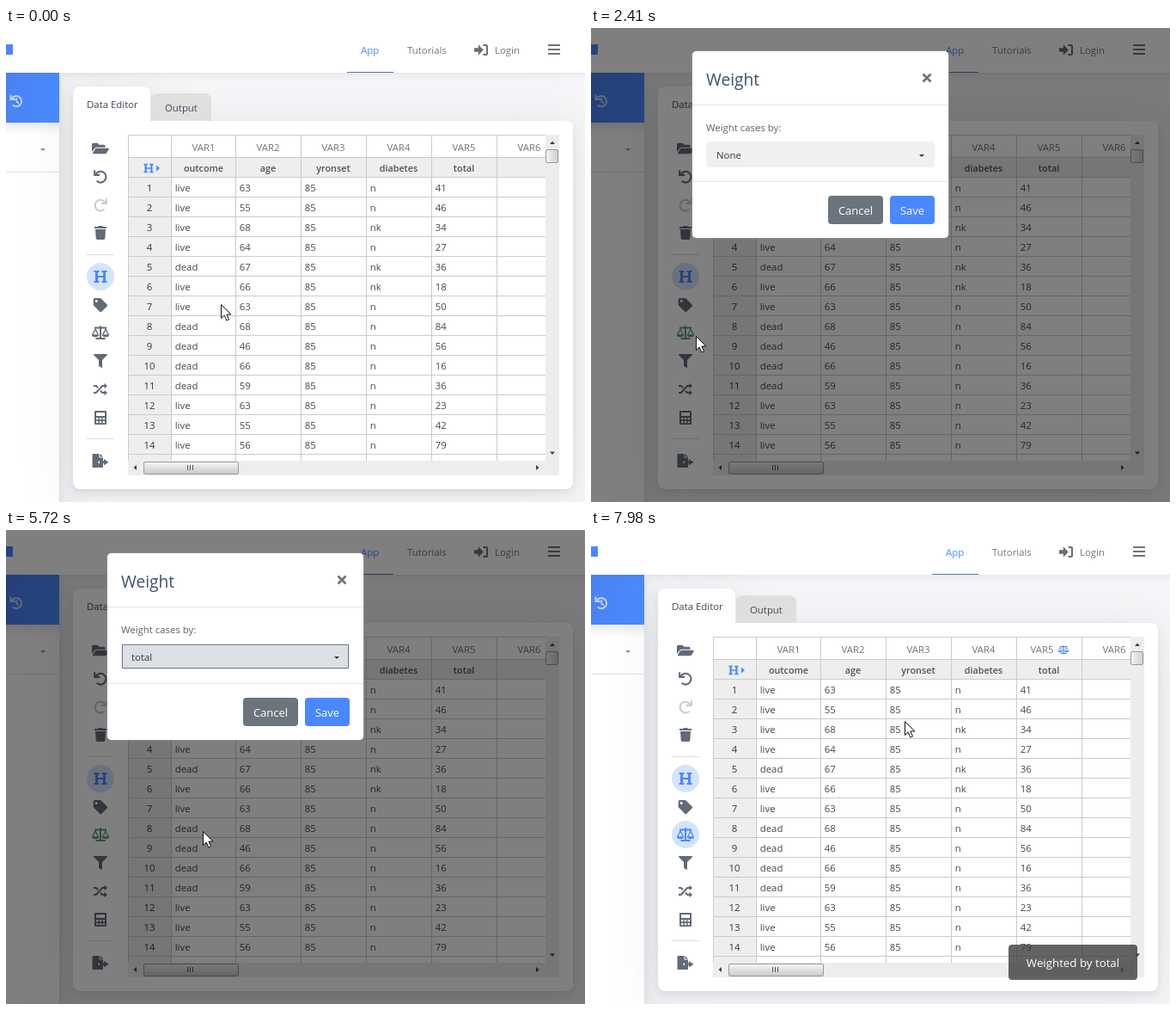
Animation of 674 by 551 pixels, one loop 8000 ms. Source, as an HTML page:

```html
<!DOCTYPE html>
<html lang="en">
<head>
<meta charset="utf-8">
<title>Weight data</title>
<style>
  html, body { margin: 0; width: 100%; height: 100%; overflow: hidden; background: #f5f6f8; }
  svg { display: block; width: 674px; height: 551px; font: 11.4px "Open Sans", "Noto Sans", sans-serif; }
  text { white-space: pre; }
  .bar { filter: drop-shadow(0 2px 5px rgba(90, 97, 105, .12)); }
  .card { filter: drop-shadow(0 4px 4px rgba(90, 97, 105, .13)) drop-shadow(0 7px 30px rgba(90, 97, 105, .12)); }
  .float { filter: drop-shadow(0 1px 8px rgba(0, 0, 0, .2)); }
</style>
</head>
<body>
<svg id="stage" viewBox="0 0 674 551" xmlns="http://www.w3.org/2000/svg"></svg>
<script>
const BLUE = '#4a88ff', TOOL = '#626a78', INK = '#42474f', GRID = '#cbcbcb';

const rect = (x, y, w, h, fill, more = '') =>
  `<rect x="${x}" y="${y}" width="${w}" height="${h}" fill="${fill}" ${more}/>`;
const text = (x, y, s, fill = INK, more = '') =>
  `<text x="${x}" y="${y}" fill="${fill}" ${more}>${s}</text>`;
const mid = (x, y, s, fill, more = '') => text(x, y, s, fill, `text-anchor="middle" ${more}`);
const path = (d, fill, more = '') => `<path d="${d}" fill="${fill}" ${more}/>`;
const line = (d, stroke, w = 1, more = '') =>
  `<path d="${d}" fill="none" stroke="${stroke}" stroke-width="${w}" ${more}/>`;
const group = (id, body, more = '') => `<g id="${id}" ${more}>${body}</g>`;
const round = r => `rx="${r}"`;

// Icons are drawn around 0,0 in currentColor
const solid = d => path(d, 'currentColor', 'fill-rule="evenodd"');
const wire = (d, w) => line(d, 'currentColor', w);
const turn = wire('M-5.6-2.8A6.4 6.4 0 1 1-4.4 4.8', 2.1) + solid('M-7.9-7.8h2.1v4.6h4.9v2.1h-7z');
const icons = {
  folder: solid('M-10 4V-4.7a1.5 1.5 0 0 1 1.5-1.5h5l2 2h5.5a1.5 1.5 0 0 1 1.5 1.5v1.5h-10a2.5 2.5 0 0 0-2.2 1.2z' +
    'M-9 5.3l2.8-4.6a2 2 0 0 1 1.7-1h13.5a.8 .8 0 0 1 .7 1.2l-2.6 4.3a2 2 0 0 1-1.7 1h-13.7a.6 .6 0 0 1-.7-.9z'),
  undo: turn,
  redo: `<g transform="scale(-1 1)">${turn}</g>`,
  history: turn + wire('M.3-4v4.6l2.8 2', 1.8),
  trash: solid('M-7-7h4l1-1h4l1 1h4v2h-14zM-6-4h12l-.7 10.6a1.5 1.5 0 0 1-1.5 1.4h-7.6a1.5 1.5 0 0 1-1.5-1.4z'),
  head: solid('M-7.5-7h6v2h-1.5v4h6v-4h-1.5v-2h6v2h-1.5v10h1.5v2h-6v-2h1.5v-4h-6v4h1.5v2h-6v-2h1.5v-10h-1.5z'),
  tag: solid('M-8.3-.2v-6.3a1.5 1.5 0 0 1 1.5-1.5h6.3a1.5 1.5 0 0 1 1.1 .4l7 7a1.5 1.5 0 0 1 0 2.1l-6.3 6.3a1.5 1.5 0 0 1-2.1 0l-7-7a1.5 1.5 0 0 1-.5-1z' +
    'M-4.8-6a1.5 1.5 0 1 0 .01 0z'),
  scale: wire('M-7-5.4h14M0-7.8v14M-5.5 7h11', 2) + wire('M-9.3 2.5L-6-4l3.3 6.5M2.7 2.5L6-4l3.3 6.5', 1.3) +
    solid('M-10.2 2.2h8.4a4.2 3 0 0 1-8.4 0zM1.8 2.2h8.4a4.2 3 0 0 1-8.4 0z'),
  filter: solid('M-7.3-8h14.6a.8 .8 0 0 1 .5 1.3l-5.8 5.8v8.1a.8 .8 0 0 1-1.2 .6l-2.5-1.8a1 1 0 0 1-.3-.6v-6.3l-5.8-5.8a.8 .8 0 0 1 .5-1.3z'),
  random: wire('M-8 4h2.8L2.2-4H5M-8-4h2.8l2.2 2.3M0 1.7L2.2 4H5', 2) +
    solid('M4.5-7.3L8-4 4.5-.7zM4.5.7L8 4 4.5 7.3z'),
  calc: solid('M-6-8h12a1 1 0 0 1 1 1v14a1 1 0 0 1-1 1h-12a1 1 0 0 1-1-1v-14a1 1 0 0 1 1-1zM-5-6v4h10v-4z' +
    [-5, -1.2, 2.6].map(x => `M${x} 0h2.4v2.2h-2.4zM${x} 4h2.4v2.2h-2.4z`).join('')),
  out: solid('M-8.5-8h7v4.5h4.5v4h-5.5v2.5h5.5v4a1 1 0 0 1-1 1h-10.5a1 1 0 0 1-1-1v-14a1 1 0 0 1 1-1zM-.5-8l3.5 3.5h-3.5z' +
    'M4-2l5.5 3.8l-5.5 3.8v-2.6h-5v-2.4h5z'),
  login: solid('M-8-2.2h4.8v-4l6 6.2-6 6.2v-4h-4.8z') + wire('M2.5-5.4h3.5a1 1 0 0 1 1 1v8.8a1 1 0 0 1-1 1h-3.5', 2)
};
const icon = (name, x, y, color, size = 1, id = '') =>
  `<g ${id && `id="${id}"`} transform="translate(${x} ${y}) scale(${size})" color="${color}">${icons[name]}</g>`;
const down = (x, y, fill, w = 3) => path(`M${x - w} ${y}h${2 * w}l${-w} ${w}z`, fill);

const rows = `live 63 n 41,live 55 n 46,live 68 nk 34,live 64 n 27,dead 67 nk 36,live 66 nk 18,live 63 n 50,
dead 68 n 84,dead 46 n 56,dead 66 n 16,dead 59 n 36,live 63 n 23,live 55 n 42,live 56 n 79`.split(',').map(r => r.trim().split(' '));
const names = ['outcome', 'age', 'yronset', 'diabetes', 'total'];
const cols = [192, 267, 343, 419, 495, 571];

function header() {
  return rect(-50, -50, 774, 102, '#fff', 'class="bar"') +
    rect(0, 19, 8, 12, BLUE) +
    text(413, 30, 'App', BLUE) + rect(397, 51, 54, 1, '#5a78b5') +
    text(467, 30, 'Tutorials', '#70767f') + icon('login', 553, 25.5, '#6c6f75') +
    text(569, 30, 'Login', '#70767f') +
    line('M631 20h14M631 25h14M631 30h14', '#707378', 2);
}

function sidebar() {
  return rect(-100, 52, 162, 600, '#fff', 'class="card"') +
    rect(0, 110, 62, 14, 'url(#drop)') + rect(0, 52, 62, 58, 'url(#blue)') +
    icon('history', 12, 85, '#bdd3fd', .95) +
    down(43, 140, '#8d9096') + rect(0, 167, 62, 1, '#dfe0e3');
}

function tools() {
  const list = [['folder', 140], ['undo', 173], ['redo', 206, '#c9ccd1'], ['trash', 238], ['tag', 322],
    ['filter', 387], ['random', 420], ['calc', 453], ['out', 503]];
  return list.map(([n, y, c]) => icon(n, 110, y, c || TOOL)).join('') +
    rect(94, 263, 32, 1, '#dcdee2') + rect(94, 477, 32, 1, '#dcdee2') +
    '<circle cx="110" cy="289" r="16" fill="#d5e3fc"/>' + icon('head', 110, 289, BLUE) +
    '<circle id="disc" cx="110" cy="354" r="16"/>' + icon('scale', 110, 354, TOOL, 1, 'balance');
}

function table() {
  let s = rect(142, 124, 502, 396, '#fff') + rect(142, 150, 486, 23, '#eee') + rect(142, 173, 50, 330, '#eee');
  s += line('M142 124.5H628M142 150.5H628' + Array.from({ length: 15 }, (_, i) => `M142 ${173.5 + 23 * i}H628`).join('') +
    [142, ...cols].map(x => `M${x + .5} 124V503`).join(''), GRID);
  cols.forEach((x, i) => s += mid(x + 38, 143, 'VAR' + (i + 1), '#70747b', i === 4 ? 'id="var5"' : ''));
  names.forEach((n, i) => s += mid(cols[i] + 38, 167, n, '#4d525a', 'font-weight="600" font-size="10.8"'));
  s += icon('head', 166, 163, BLUE, .75) + path('M175 159.5l4 3.5-4 3.5z', BLUE);
  rows.forEach(([state, age, dia, total], r) => {
    const y = 190 + 23 * r;
    s += mid(167, y, r + 1, '#34383e');
    [state, age, 85, dia, total].forEach((v, c) => s += text(cols[c] + 4.7, y, v));
  });
  return s + group('mark', icon('scale', 550, 139, BLUE, .62));
}

function scrollbars() {
  const edge = 'stroke="#9a9a9a" rx="1.5"';
  return rect(628, 124, 16, 396, '#ededed') + rect(142, 503, 502, 17, '#ededed') +
    rect(628.5, 141.5, 14, 15, 'url(#thumbV)', edge) + rect(160.5, 504.5, 110, 14, 'url(#thumbH)', edge) +
    line('M211.5 508v6M214.5 508v6M217.5 508v6', '#555') +
    path('M633 135l3-3.5 3 3.5zM633 492.5l3 3.5 3-3.5zM152 508l-3.5 3 3.5 3zM617 508l3.5 3-3.5 3z', '#444');
}

function page() {
  const panel = 'M78 108V76a8 8 0 0 1 8-8h74a8 8 0 0 1 8 8v32h484a8 8 0 0 1 8 8v412a8 8 0 0 1-8 8H86a8 8 0 0 1-8-8z';
  return rect(0, 0, 674, 551, '#f5f6f8') + sidebar() + path(panel, '#fff', 'class="card"') +
    path('M169 108V84a8 8 0 0 1 8-8h54a8 8 0 0 1 8 8v24z', '#dfdfdf') +
    text(94, 93, 'Data Editor', '#414958') + text(185, 97, 'Output', '#414958') +
    header() + tools() + table() + scrollbars();
}

function modal() {
  return rect(117.5, 26.5, 299, 218, '#fff', 'rx="5" stroke="#000" stroke-opacity=".25"') +
    text(134, 67, 'Weight', '#3d5170', 'font-size="19.2"') +
    line('M386.5 53.5l9 9m0-9l-9 9', '#6c737b', 2.6) +
    rect(118, 89, 298, 1, '#e0e4e8') + rect(118, 178, 298, 1, '#e0e4e8') +
    text(134, 120, 'Weight cases by:', '#5a6169') +
    rect(132.5, 130.5, 269, 33, 'none', 'id="ring" rx="5" stroke="#e9ebed" stroke-width="3"') +
    rect(134, 132, 266, 30, '#f0f0f0', 'id="field" rx="4"') +
    rect(135.5, 133.5, 263, 27, 'none', 'id="dots" stroke="#222" stroke-dasharray="1 1"') +
    text(146, 152, 'None', '#33383e', 'id="choice"') + down(385, 147, '#33383e') +
    rect(276, 195, 64, 33, '#6c757d', round(4)) + mid(308, 217, 'Cancel', '#fff', 'font-size="13"') +
    rect(348, 195, 52, 33, BLUE, 'id="save" rx="4"') + mid(374, 217, 'Save', '#fff', 'font-size="13"');
}

function menu() {
  return rect(134, 163, 266, 211, '#fff', 'rx="4" class="float"') +
    rect(150.5, 170.5, 233, 33, '#fff', 'rx="4" stroke="#ced4da"') +
    rect(163, 179, 1, 16, '#222', 'id="caret"') + rect(134, 210, 266, 26, BLUE) +
    ['None', ...names].map((n, i) => text(154, 228 + 26 * i, n, i ? '#24282d' : '#fff')).join('');
}

const grad = (id, dir, from, to) =>
  `<linearGradient id="${id}" ${dir}><stop stop-color="${from}"/><stop offset="1" stop-color="${to}"/></linearGradient>`;
const across = 'x2="1" y2="0"', along = 'x2="0" y2="1"';

document.getElementById('stage').innerHTML =
  '<defs>' + grad('blue', across, '#4a82f4', '#4a8bff') +
  grad('drop', along, 'rgba(40,50,70,.1)', 'rgba(40,50,70,0)') +
  grad('thumbV', across, '#f6f6f6', '#cfcfcf') + grad('thumbH', along, '#f6f6f6', '#c9c9c9') + '</defs>' +
  page() + rect(0, 0, 674, 551, '#000', 'id="shade"') +
  group('modal', modal()) + group('menu', menu()) +
  group('tip', rect(8, 342, 79, 24, '#000', round(4)) + path('M87 350l4.5 4-4.5 4z', '#000') + text(15, 358.5, 'Weight Data', '#fff')) +
  group('toast', rect(486, 482, 150, 41, '#3c3c3c', 'rx="4" fill-opacity=".8"') +
    mid(561, 508, 'Weighted by total', '#fff', 'font-size="13.3"')) +
  group('arrow', path('M.5.5v16l3.7-3.5 2.7 6 2.6-1.1-2.6-5.9h5z', '#fff', 'stroke="#111"')) +
  group('hand', path('M-.5 13V1.8a1.6 1.6 0 0 1 3.2 0V7.2a1.5 1.5 0 0 1 3 .3a1.5 1.5 0 0 1 3 .6a1.5 1.5 0 0 1 3 .8V14.5l-2 4V21.5H1v-2.5l-4.3-6a1.5 1.5 0 0 1 2.3-1.6z', '#fff', 'stroke="#111"') +
    line('M2.7 7v4M5.7 7.5v3.5M8.7 8.3v3', '#111'));

const el = {};
document.querySelectorAll('svg [id]').forEach(e => el[e.id] = e);
const set = (id, attrs) => { for (const k in attrs) el[id].setAttribute(k, attrs[k]); };
const show = (id, on) => set(id, { opacity: +on });

const ramp = (t, a, b) => Math.min(1, Math.max(0, (t - a) / (b - a)));
const smooth = p => p * p * (3 - 2 * p);
const easeOut = p => 1 - (1 - p) ** 3;
const within = (t, a, b) => t >= a && t < b;
const blend = (a, b, p) => `rgb(${a.map((v, i) => Math.round(v + (b[i] - v) * p))})`;

// Each move: start, end, from, bend, to
const moves = [
  [500, 1320, [250, 321], [185, 352], [122, 358]],
  [2420, 3100, [122, 358], [196, 300], [202, 153]],
  [4150, 4600, [202, 153], [212, 245], [223, 327]],
  [4700, 4830, [223, 327], [227, 340], [229, 350]],
  [5970, 6740, [229, 350], [300, 278], [365, 222]]
];
function pointer(t) {
  const [a, b, from, bend, to] = moves.filter(m => t >= m[0]).pop() || moves[0];
  const p = smooth(ramp(t, a, b)), q = 1 - p;
  return [0, 1].map(i => Math.round(q * q * from[i] + 2 * q * p * bend[i] + p * p * to[i]));
}

function draw(t) {
  const [x, y] = pointer(t);
  const hand = within(t, 2980, 5540) || within(t, 6480, 7690);
  for (const id of ['arrow', 'hand']) set(id, { transform: `translate(${x} ${y})` });
  show('arrow', !hand);
  show('hand', hand);

  // Balance button and its tooltip
  const weighted = t >= 7390;
  const hover = ramp(t, 1190, 1320) * (1 - ramp(t, 2040, 2190));
  set('disc', { fill: weighted ? '#d5e3fc' : '#69707d', opacity: weighted ? 1 : hover });
  set('balance', { color: weighted ? BLUE : t > 2190 ? '#5a9c72' : blend([98, 106, 120], [255, 255, 255], hover) });
  show('mark', weighted);
  set('var5', { x: weighted ? 525 : 533 });
  set('tip', { opacity: ramp(t, 1330, 1480) * (1 - ramp(t, 2020, 2170)) });

  // Dialog and backdrop
  set('shade', { opacity: .5 * ramp(t, 1918, 2068) * (1 - ramp(t, 7740, 7890)) });
  const lift = -50 * (1 - easeOut(ramp(t, 2070, 2370)) + easeOut(ramp(t, 7390, 7690)));
  set('modal', {
    opacity: ramp(t, 2070, 2220) * (1 - ramp(t, 7390, 7540)),
    transform: `translate(0 ${lift})`
  });
  const pressed = ramp(t, 3620, 3770) * (1 - ramp(t, 7260, 7410));
  set('field', { fill: blend([240, 240, 240], [218, 224, 229], pressed) });
  show('ring', within(t, 3630, 5540));
  show('dots', within(t, 5540, 7270));
  el.choice.textContent = t < 5540 ? 'None' : 'total';
  set('save', { fill: blend([74, 136, 255], [37, 112, 240], ramp(t, 6480, 6630)) });

  show('menu', within(t, 3770, 5540));
  show('caret', !within(t, 4470, 5000));

  const rise = easeOut(ramp(t, 7700, 7950));
  set('toast', { opacity: rise, transform: `translate(0 ${37 * (1 - rise)})` });
}

function tick() {
  draw(performance.now() % 8000);
  requestAnimationFrame(tick);
}
tick();
</script>
</body>
</html>
```
